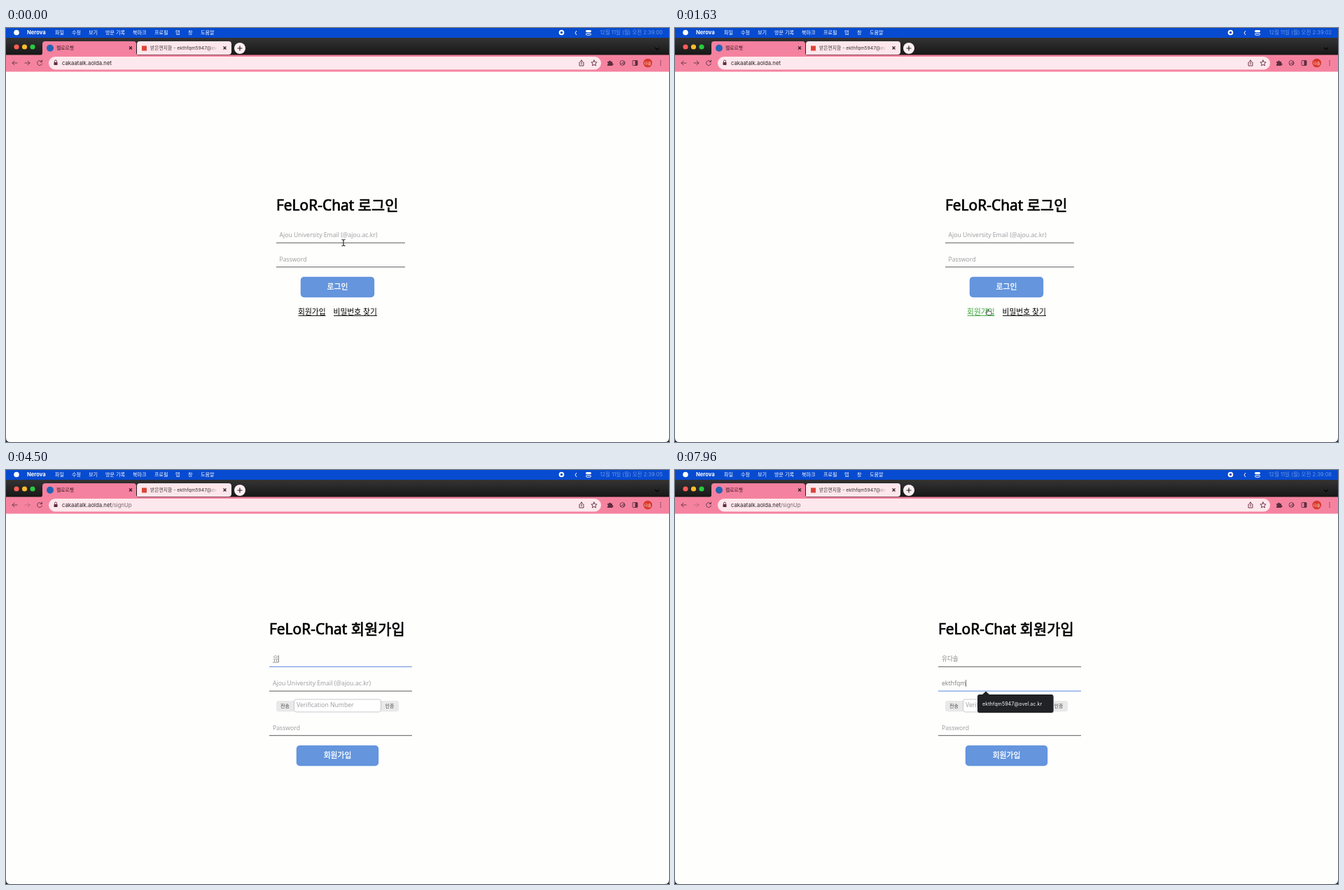
Write an HTML page that moves like this. It is 947 by 592 pixels and loops after 8000 ms.

```html
<!DOCTYPE html>
<html lang="ko">
<head>
<meta charset="utf-8">
<title>FeLoR-Chat</title>
<style>
  html, body { margin: 0; width: 100%; height: 100%; overflow: hidden; background: #fefefd; }
  svg { display: block; width: 947px; height: 592px; }
  text { font-family: 'Noto Sans', 'Noto Sans CJK KR', sans-serif; white-space: pre; }
  .ui text { font-family: Inter, 'Noto Sans CJK KR', sans-serif; }
  .menu text { font-size: 7.1px; fill: #fff; font-weight: 500; }
  .title { font-size: 20.9px; stroke: #000; stroke-width: .7; }
  .field { font-size: 8.65px; fill: #a0a0a4; }
  .field.typed { fill: #858588; }
  .button { font-size: 10.8px; fill: #fff; stroke: #fff; stroke-width: .3; text-anchor: middle; }
  .link { font-size: 10.8px; }
  .small { font-size: 7px; fill: #444; text-anchor: middle; }
  .icon { fill: none; stroke: #6d3a4b; stroke-width: 1; stroke-linecap: round; stroke-linejoin: round; }
</style>
</head>
<body>
<svg viewBox="0 0 947 592">
  <defs>
    <linearGradient id="strip" x2="0" y2="1"><stop stop-color="#343434"/><stop offset="1" stop-color="#161616"/></linearGradient>
    <linearGradient id="tabFade"><stop offset=".86" stop-color="#fde7ec" stop-opacity="0"/><stop offset="1" stop-color="#fde7ec"/></linearGradient>
    <clipPath id="tabClip"><path d="M204 19h97v19h-97z"/></clipPath>
  </defs>

  <path fill="#222" d="M0 584h947v8H0z"/>
  <path fill="#fefefd" d="M0 62h947v524q0 6-6 6H6q-6 0-6-6z"/>

  <g class="ui">
    <g class="menu">
      <rect width="947" height="14" fill="#074bd0"/>
      <circle cx="15" cy="6.5" r="3.8" fill="#fff"/>
      <text x="30" y="9" style="font-size:7.6px;font-weight:700">Nerova</text>
      <g id="menuItems"></g>
      <circle cx="793.5" cy="6.5" r="2.8" fill="none" stroke="#fff" stroke-width="2"/>
      <path d="M815 4l-2 3 2 3" fill="none" stroke="#fff"/>
      <rect x="828" y="3" width="8" height="3" rx="1.5" fill="#fff"/>
      <rect x="828.5" y="7.5" width="7" height="2.6" rx="1.3" fill="none" stroke="#fff"/>
      <text id="clock" x="938" y="9" text-anchor="end" style="font-size:7.5px;font-weight:400;fill:#6c98e4"></text>
    </g>

    <rect y="14" width="947" height="25" fill="url(#strip)"/>
    <circle cx="15" cy="27" r="3.6" fill="#fb5d57"/>
    <circle cx="26.5" cy="27" r="3.6" fill="#f9bc2e"/>
    <circle cx="38" cy="27" r="3.6" fill="#2ac840"/>
    <path fill="#f3819f" d="M49 39q3 0 3-4V23q0-4 4-4h126q4 0 4 4v12q0 4 3 4z"/>
    <path fill="#fde7ec" d="M187 38V23q0-4 4-4h127q4 0 4 4v11q0 4-4 4z"/>
    <circle cx="63" cy="28.7" r="5" fill="#2463b5"/>
    <text x="72" y="31" font-size="6.8" fill="#3a1620">펠로르챗</text>
    <rect x="194" y="25.5" width="7" height="7" fill="#dd4438"/>
    <text x="206" y="31" font-size="6.8" fill="#3d3235" clip-path="url(#tabClip)">받은편지함 - ekthfqm5947@ovel.ac.kr</text>
    <rect x="206" y="20" width="96" height="17" fill="url(#tabFade)"/>
    <path d="M176 26.5l4 4m0-4l-4 4M310.5 26.5l4 4m0-4l-4 4" stroke="#2c1a20" stroke-width="1.1"/>
    <circle cx="334" cy="29" r="8" fill="#fdeff2"/>
    <path d="M330.5 29h7M334 25.5v7" stroke="#222" stroke-width="1.2"/>
    <path d="M927 28l3 3 3-3" fill="none" stroke="#050505" stroke-width="1.2"/>

    <rect y="38.5" width="947" height="24" fill="#f5839f"/>
    <rect x="61" y="41" width="789" height="18.5" rx="9.25" fill="#fde8ed"/>
    <g class="icon">
      <path d="M16 50H9m3-3l-3 3 3 3"/>
      <path id="forward" d="M27 50h7m-3-3l3 3-3 3"/>
      <path d="M51 48a3.5 3.5 0 1 0 .5 3M51.5 46v2.5H49"/>
      <path d="M69.5 49v-1.5a1.5 1.5 0 0 1 3 0V49"/>
      <path d="M820 49h-1v5h6v-5h-1M822 52v-6m-1.5 1.5L822 46l1.5 1.5"/>
      <path d="M840 46l1.2 2.7 2.9.3-2.2 2 .6 2.9-2.5-1.5-2.5 1.5.6-2.9-2.2-2 2.9-.3z"/>
      <circle cx="880.5" cy="50" r="3.5"/><path d="M878.5 51.5l4-3M881 51.5h2v-2"/>
      <rect x="895" y="46.5" width="7" height="7" rx="1"/>
    </g>
    <g fill="#5d2e3e">
      <rect x="68.5" y="49" width="5" height="4" rx=".6"/>
      <path d="M859 48h2a1.5 1.5 0 0 1 3 0h2v2.2a1.5 1.5 0 0 1 0 3V54h-7v-2a1.3 1.3 0 0 0 0-2.5z"/>
      <path d="M898.5 46.5h3.5v7h-3.5z"/>
      <circle cx="935" cy="47" r=".8"/><circle cx="935" cy="50" r=".8"/><circle cx="935" cy="53" r=".8"/>
    </g>
    <circle cx="916.7" cy="50" r="6.3" fill="#da3a2b"/>
    <text x="916.7" y="52" font-size="5" fill="#fff" text-anchor="middle">다솔</text>
    <text x="80" y="52.7" font-size="7.75" fill="#2a2125">cakaatalk.aolda.net<tspan id="path" fill="#77666c">/signUp</tspan></text>
  </g>

  <g id="login">
    <text class="title" x="386" y="261">FeLoR-Chat 로그인</text>
    <text class="field" x="390.5" y="299">Ajou University Email (@ajou.ac.kr)</text>
    <text class="field" x="390.5" y="333.5">Password</text>
    <path d="M386 307.2h184M386 341.8h184" stroke="#5c5c60"/>
    <rect id="loginButton" x="420.8" y="355.8" width="105.4" height="29.4" rx="5"/>
    <text class="button" x="473.5" y="374">로그인</text>
    <g id="signUpLink"><text class="link" x="417" y="409.5">회원가입</text><path d="M417.5 411.3h39" stroke="currentColor"/></g>
    <text class="link" x="467.5" y="409.5">비밀번호 찾기</text><path d="M468 411.3h62" stroke="#000"/>
  </g>

  <g id="signUp">
    <text class="title" x="376" y="235">FeLoR-Chat 회원가입</text>
    <text id="name" x="381" y="273"></text>
    <text id="email" x="381" y="308"></text>
    <text class="field" x="381" y="371.5">Password</text>
    <path id="nameLine" d="M376 281.3h204"/>
    <path id="emailLine" d="M376 316.1h204"/>
    <path d="M376 379.7h204" stroke="#5c5c60"/>
    <path id="composing" stroke="#777" stroke-width=".8"/>
    <path id="caret" stroke="#555" stroke-width=".8"/>
    <path fill="#e9e9e9" d="M389 330h22v15.5h-22q-3 0-3-3v-9.5q0-3 3-3zM536 330h22q3 0 3 3v9.5q0 3-3 3h-22z"/>
    <text class="small" x="398.5" y="340.3">전송</text>
    <text class="small" x="548" y="340.3">인증</text>
    <rect x="411.5" y="328" width="124" height="18" rx="3" fill="#fff" stroke="#c9c9cd"/>
    <text class="field" x="415" y="339.3">Verification Number</text>
    <rect id="signUpButton" x="414.8" y="393.8" width="117.4" height="29.4" rx="5"/>
    <text class="button" x="473.5" y="411.5">회원가입</text>
    <g id="suggestion" class="ui">
      <rect x="432" y="322" width="109" height="26" rx="3" fill="#000" opacity=".18"/>
      <path fill="#202225" d="M435 321h4l5-4.5 5 4.5h88.5q3 0 3 3v20q0 3-3 3H435q-3 0-3-3v-20q0-3 3-3z"/>
      <text x="439" y="336.5" font-size="7.2" fill="#f2f2f2">ekthfqm5947@ovel.ac.kr</text>
    </g>
  </g>

  <g id="cursor">
    <path id="beam" d="M-2.5-4.5Q0-4.5 0-3Q0-4.5 2.5-4.5M0-3V3M-2.5 4.5Q0 4.5 0 3Q0 4.5 2.5 4.5" fill="none" stroke="#222" stroke-width="1.1"/>
    <path id="hand" d="M-2 1V-3.4q0-.9.8-.9t.8.9v2.6q.8-.7 1.500 0 .8-.5 1.400.2 1.500-.4 1.500 1V2q0 1.500-1 2.600h-4Q-3 3-4.200.8q.8-1.200 2.200.2z" fill="#fff" stroke="#444" stroke-width=".9" stroke-linejoin="round"/>
    <path id="arrow" d="M0-5v9l2-2 1.5 3.5 1.3-.6L3.4 1.5h2.8z" fill="#111" stroke="#fff" stroke-width=".7"/>
  </g>
</svg>
<script>
const LOOP = 8000, PAGE_SWITCH = 2100;
const NAME_FOCUS = 3500, EMAIL_FOCUS = 5350, TYPING = 4380;

const $ = id => document.getElementById(id);
const show = (id, on) => $(id).setAttribute('display', on ? 'inline' : 'none');
const set = (id, attrs) => { for (const key in attrs) $(id).setAttribute(key, attrs[key]); };
const clamp = v => Math.min(1, Math.max(0, v));
const mix = (a, b, k) => `rgb(${a.map((v, i) => Math.round(v + (b[i] - v) * k))})`;

// Fades in from time a and out from time b.
const hover = (t, a, b, length = 200) => clamp((t - a) / length) - clamp((t - b) / length);

const BLUE = [100, 149, 221], STEEL = [80, 136, 192];
const BLACK = [0, 0, 0], GREEN = [61, 166, 61];
const LINE = [92, 92, 96], FOCUS = [91, 134, 226];

const menu = { 70: '파일', 94: '수정', 118: '보기', 142: '방문 기록', 181: '북마크', 212: '프로필', 242: '탭', 260: '창', 278: '도움말' };
$('menuItems').innerHTML = Object.entries(menu).map(([x, label]) => `<text x="${x}" y="8.7">${label}</text>`).join('');

const pointerPath = [
  [0, 482, 307], [80, 481, 310], [270, 467, 365], [460, 452, 398], [750, 448, 406],
  [2450, 448, 406], [2650, 450, 375], [2950, 459, 272], [3150, 459, 267], [LOOP, 459, 267]
];
const nameKeys = [[4380, 'ㅇ'], [4470, '유'], [4620, '윧'], [4740, '유다'], [4860, '유닷'], [4980, '유다소'], [5100, '유다솔']];
const emailKeys = [6850, 6990, 7120, 7260, 7400, 7580, 7760].map((time, i) => [time, 'ekthfqm'.slice(0, i + 1)]);

const latest = (keys, t) => keys.reduce((found, key) => key[0] <= t ? key : found, [0, '']);

function pointerAt(t) {
  const i = pointerPath.findIndex(p => p[0] > t);
  const [t0, x0, y0] = pointerPath[i - 1], [t1, x1, y1] = pointerPath[i];
  const k = (t - t0) / (t1 - t0);
  return [x0 + (x1 - x0) * k, y0 + (y1 - y0) * k];
}

function drawField(id, value, placeholder) {
  $(id).textContent = value || placeholder;
  set(id, { class: value ? 'field typed' : 'field' });
}

function drawPointer(t) {
  const [x, y] = pointerAt(t);
  const signUp = t >= PAGE_SWITCH;
  const hand = signUp ? y > 394 : y > 356;
  const beam = !hand && (signUp ? y < 316 || (y > 328 && y < 380) : y < 342);
  show('cursor', t < TYPING);
  show('hand', hand);
  show('beam', beam);
  show('arrow', !hand && !beam);
  set('cursor', { transform: `translate(${x} ${y})` });
}

function drawSignUp(t) {
  const [nameTime, name] = latest(nameKeys, t), [emailTime, email] = latest(emailKeys, t);
  drawField('name', name, 'Name');
  drawField('email', email, 'Ajou University Email (@ajou.ac.kr)');
  set('nameLine', { stroke: mix(LINE, FOCUS, hover(t, NAME_FOCUS, EMAIL_FOCUS, 100)) });
  set('emailLine', { stroke: mix(LINE, FOCUS, hover(t, EMAIL_FOCUS, LOOP, 100)) });
  set('signUpButton', { fill: mix(BLUE, STEEL, hover(t, PAGE_SWITCH, 2560)) });

  const inEmail = t >= EMAIL_FOCUS;
  const id = inEmail ? 'email' : 'name', value = inEmail ? email : name;
  const end = 381 + (value ? $(id).getComputedTextLength() : 0);
  const base = inEmail ? 308 : 273;
  const blinkStart = inEmail ? Math.max(EMAIL_FOCUS, emailTime) : Math.max(NAME_FOCUS, nameTime);
  show('caret', t >= NAME_FOCUS && (t - blinkStart) % 1000 < 500);
  set('caret', { d: `M${end + .3} ${base - 8}v10` });
  show('composing', !inEmail && name);
  set('composing', { d: `M${end - 8} ${base + 2}H${end}` });
  show('suggestion', email);
}

function draw() {
  const t = performance.now() % LOOP, signUp = t >= PAGE_SWITCH;
  $('clock').textContent = `12월 11일 (월) 오전 2:39:0${Math.floor((t + 700) / 1000)}`;
  show('login', !signUp);
  show('signUp', signUp);
  show('path', signUp);
  set('forward', { opacity: signUp ? .35 : 1 });
  if (signUp) drawSignUp(t);
  else {
    const link = mix(BLACK, GREEN, hover(t, 460, LOOP));
    set('loginButton', { fill: mix(BLUE, STEEL, hover(t, 200, 450)) });
    set('signUpLink', { fill: link, color: link });
  }
  drawPointer(t);
  requestAnimationFrame(draw);
}
draw();
</script>
</body>
</html>
```
